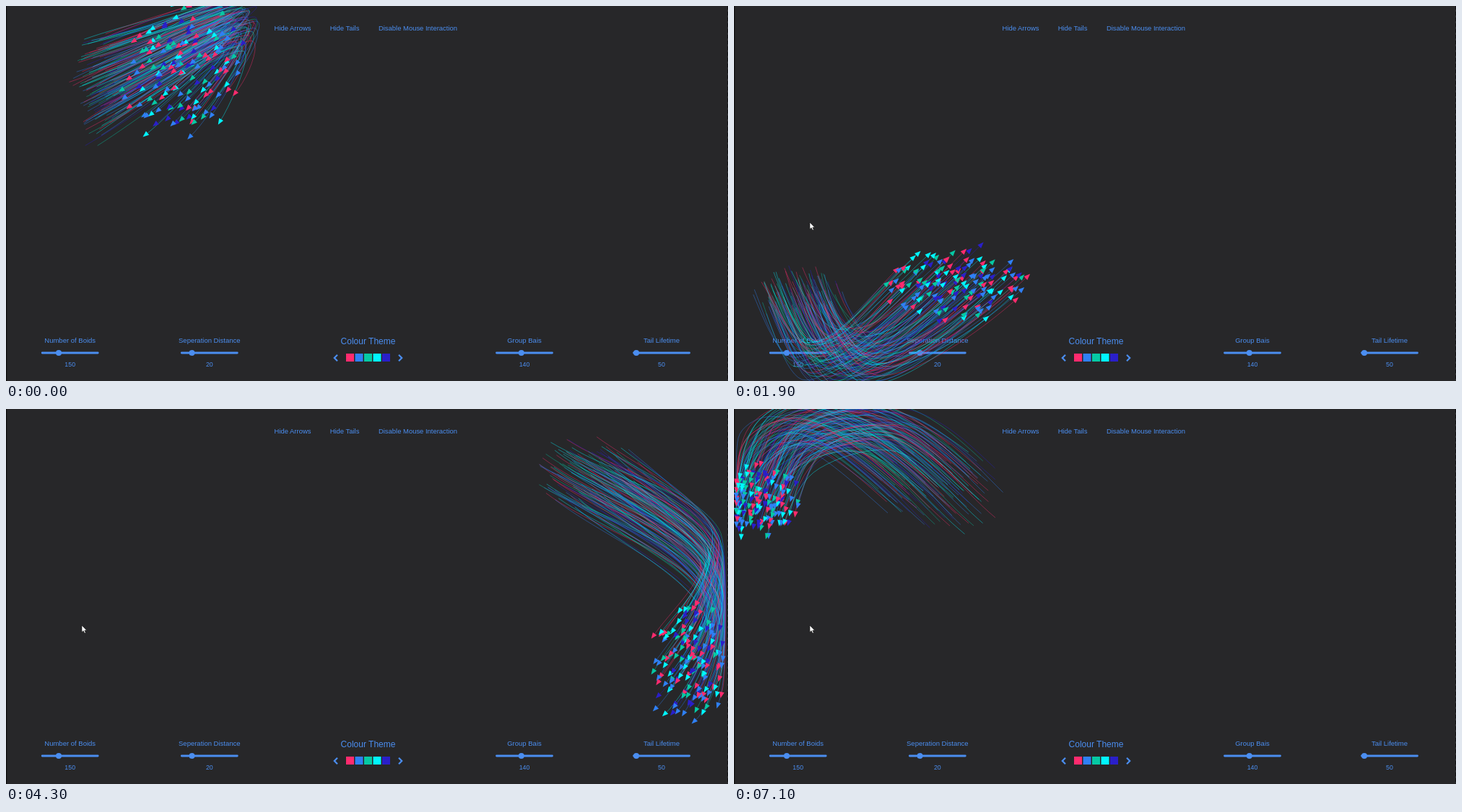
An HTML page with a canvas that plays this animation: 1000x520 px, repeating every 7.2 s.

```html
<!DOCTYPE html>
<html lang="en">
<head>
<meta charset="utf-8">
<title>Boids</title>
<style>
  html, body { margin: 0; width: 100%; height: 100%; overflow: hidden; background: #272729; }
  svg, canvas { position: absolute; left: 0; top: 0; width: 100%; height: 100%; display: block; }
  text { font-family: "Liberation Sans", Arial, sans-serif; fill: #4b8ef0; text-anchor: middle; }
</style>
</head>
<body>
<svg id="ui" viewBox="0 0 1000 520"></svg>
<canvas id="flock" width="1000" height="520"></canvas>
<svg viewBox="0 0 1000 520">
  <path id="cursor" d="M0 0V9.5L2.2 7.6L3.8 11L5.4 10.2L3.9 7H6.8Z" fill="#fff" stroke="#111" stroke-width=".6"/>
</svg>
<script>
const LOOP = 7200, STEP = 100, TAIL = 833, COUNT = 150;
const COLORS = ['#ff2b6e', '#2f80f5', '#06c9a4', '#00f6ff', '#2a1fc9'];
const BLUE = '#4b8ef0';

// time, centre x, centre y, half width, half height
const PATH = [
  [-870, 112, 118, 35, 82],
  [-300, 315, 24, 26, 46],
  [0, 245, 88, 80, 92],
  [600, 70, 245, 105, 60],
  [1067, 88, 397, 62, 36],
  [1400, 155, 490, 70, 42],
  [1900, 305, 385, 103, 50],
  [2667, 537, 138, 70, 60],
  [3150, 692, 24, 80, 42],
  [3500, 815, 96, 76, 48],
  [4000, 980, 225, 24, 68],
  [4300, 948, 350, 52, 88],
  [4567, 862, 420, 54, 52],
  [4900, 752, 486, 74, 44],
  [5400, 558, 365, 90, 56],
  [6267, 285, 108, 85, 62],
  [6600, 165, 24, 92, 42],
  [6850, 74, 46, 65, 44],
  [7100, 34, 126, 58, 50],
  [7200, 34, 166, 58, 50]
];

function drawUi() {
  const label = (x, y, size, s) => `<text x="${x}" y="${y}" font-size="${size}">${s}</text>`;
  const slider = (x, knob, name, value) => label(x, 466.6, 9.5, name) + label(x, 500.2, 8.8, value) +
    `<path d="M${x - 38.5} 481h77" stroke="${BLUE}" stroke-width="2.8" stroke-linecap="round"/>
     <circle cx="${knob}" cy="481" r="4" fill="${BLUE}"/>`;
  const chevron = (x, dir) =>
    `<path d="M${x - 2 * dir} 483.8l${4.2 * dir} 4.2l${-4.2 * dir} 4.2" fill="none" stroke="${BLUE}" stroke-width="2.2"/>`;
  const swatch = (c, i) => `<rect x="${471 + 12.5 * i}" y="482" width="11" height="11" fill="${c}"/>`;
  document.getElementById('ui').innerHTML =
    '<path d="M.5 0V520" stroke="#0c0c0d" stroke-width="1.4"/>' +
    '<path d="M999.6 0V520" stroke="#0c0c0d" stroke-dasharray="5 3"/>' +
    label(397, 34, 9.45, 'Hide Arrows') + label(469, 34, 9.45, 'Hide Tails') +
    label(570.5, 34, 9.45, 'Disable Mouse Interaction') +
    slider(88.7, 73, 'Number of Boids', 150) + slider(281.8, 257.5, 'Seperation Distance', 20) +
    slider(718, 713.8, 'Group Bais', 140) + slider(908, 873, 'Tail Lifetime', 50) +
    label(501.5, 468.7, 12, 'Colour Theme') +
    chevron(457, -1) + chevron(546, 1) + COLORS.map(swatch).join('');
}

let seed = 71;
const random = () => (seed = seed * 16807 % 2147483647) / 2147483647;

const boids = Array.from({ length: COUNT }, (_, i) => {
  const angle = i * 2.39996, radius = Math.pow((i + .5) / COUNT, .56);
  return {
    u: radius * Math.cos(angle), v: radius * Math.sin(angle),
    lag: (random() - .5) * 70, phase: random() * 6.28, rate: .002 + random() * .002,
    color: COLORS[Math.floor(random() * 5)]
  };
});

// Cubic Hermite through the path table
function flockAt(t) {
  let i = 0;
  while (i < PATH.length - 2 && t >= PATH[i + 1][0]) i++;
  const a = PATH[i], b = PATH[i + 1];
  const before = PATH[Math.max(i - 1, 0)], after = PATH[Math.min(i + 2, PATH.length - 1)];
  const span = b[0] - a[0], s = (t - a[0]) / span, s2 = s * s, s3 = s2 * s;
  return [1, 2, 3, 4].map(k => {
    const m0 = (b[k] - before[k]) / (b[0] - before[0]) * span;
    const m1 = (after[k] - a[k]) / (after[0] - a[0]) * span;
    return (2 * s3 - 3 * s2 + 1) * a[k] + (s3 - 2 * s2 + s) * m0 + (3 * s2 - 2 * s3) * b[k] + (s3 - s2) * m1;
  });
}

const softMin = (x, wall, k) => wall + k * Math.log1p(Math.exp((x - wall) / k));

function boidAt(b, t) {
  const [cx, cy, rx, ry] = flockAt(t + b.lag);
  const wander = t * b.rate + b.phase;
  let x = cx + rx * (b.u * .93 + .13 * Math.sin(wander));
  const y = cy + ry * (b.v * .93 + .13 * Math.cos(wander * 1.2));
  x = softMin(x, 3, 6);
  x = 1000 - softMin(1000 - x, 3, 6);
  return [x, y];
}

const ctx = document.getElementById('flock').getContext('2d');
const cursor = document.getElementById('cursor');

function drawFlock(t) {
  ctx.clearRect(0, 0, 1000, 520);
  ctx.lineWidth = 1;
  ctx.globalAlpha = .42;
  for (const b of boids) {
    ctx.strokeStyle = b.color;
    ctx.beginPath();
    for (let i = 0; i <= 32; i++) ctx.lineTo(...boidAt(b, t - TAIL * i / 32));
    ctx.stroke();
  }
  ctx.globalAlpha = 1;
  for (const b of boids) {
    const [x, y] = boidAt(b, t), [px, py] = boidAt(b, t - 25);
    ctx.save();
    ctx.translate(x, y);
    ctx.rotate(Math.atan2(y - py, x - px));
    ctx.fillStyle = b.color;
    ctx.beginPath();
    ctx.moveTo(4.5, 0);
    ctx.lineTo(-4, -3.4);
    ctx.lineTo(-4, 3.4);
    ctx.fill();
    ctx.restore();
  }
}

function drawCursor(t) {
  const s = Math.min(Math.max((t - 600) / 600, 0), 1), e = s * s * (3 - 2 * s);
  cursor.setAttribute('transform', `translate(${993 - 888 * e} ${511 - 211 * e})`);
  cursor.style.visibility = t < 500 ? 'hidden' : 'visible';
}

drawUi();
const start = performance.now();
let shown = -1;
function tick() {
  const t = Math.floor((performance.now() - start) % LOOP / STEP) * STEP;
  if (t !== shown) {
    shown = t;
    drawFlock(t);
    drawCursor(t);
  }
  requestAnimationFrame(tick);
}
tick();
</script>
</body>
</html>
```
